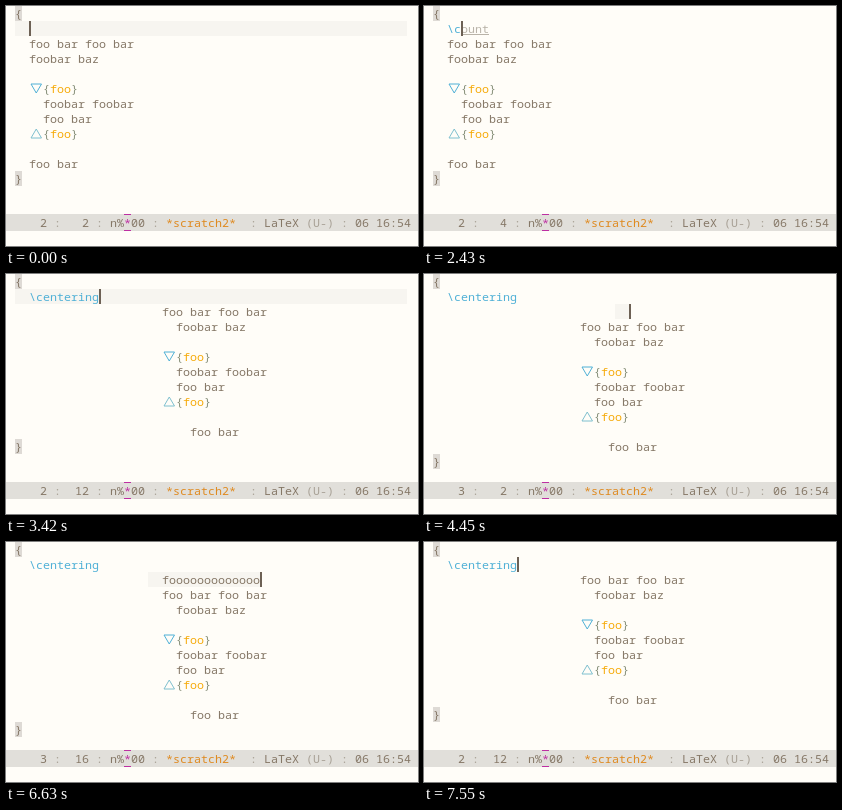
Write an HTML page that moves like this. It is 412x240 px and loops after 8 s.

```html
<!DOCTYPE html>
<html lang="en">
<head>
<meta charset="utf-8">
<title>Centering in an editor</title>
<style>
  html, body { margin: 0; width: 100%; height: 100%; overflow: hidden; background: #fffdf8; }
  svg { display: block; width: 412px; height: 240px; }
  text { font: 11.667px "Noto Sans Mono", monospace; white-space: pre; }
</style>
</head>
<body>
<svg id="stage" viewBox="0 0 412 240"></svg>
<script>
const LOOP = 8000, CHAR = 7, ROW = 15, LEFT = 9;
const INK = '#857766', DIM = '#a8a196', BLUE = '#4fb0d6', ORANGE = '#df8a20',
      GOLD = '#f6ab0c', BRACE = '#87907a', LINE = '#f7f5f0', MATCH = '#dedad5',
      REGION = '#a39c8f', BAR = '#e1dfda', CURSOR = '#6d6155', PINK = '#bd2fa2';
const COMMAND = '\\centering';
const stage = document.getElementById('stage');

const colX = col => LEFT + col * CHAR;
const rect = (x, y, w, h, fill) =>
  `<rect x="${x}" y="${y}" width="${w}" height="${h}" fill="${fill}"/>`;
const label = (x, y, str, fill = INK, extra = '') =>
  `<text x="${x}" y="${y}" fill="${fill}" ${extra}>${str}</text>`;
const put = (col, row, str, fill) => label(colX(col), row * ROW + 12, str, fill);
const fillRow = (x, row, right, fill) => rect(x, row * ROW, right - x, ROW, fill);
const cursor = (col, row) => rect(colX(col), row * ROW, 2, ROW, CURSOR);
const centerCol = width => 28 - Math.floor(width / 2);

// Number of command characters typed so far.
function commandLength(t) {
  if (t < 1310) return 0;
  if (t < 2430) return 1;
  if (t < 3150) return Math.min(8, 2 + Math.floor((t - 2430) / 90));
  return t < 3240 ? 9 : 10;
}

// Length of the "fooo..." word on the new line.
function wordLength(t) {
  if (t < 5100) return 0;
  if (t < 5370) return t < 5190 ? 2 : 3;
  if (t < 5640) return t < 5460 ? 4 : 5;
  if (t < 6450) return 6 + Math.floor(Math.min(8, Math.floor((t - 5640) / 90)) * 7 / 9);
  return t < 6630 ? 13 : 14;
}

function stateAt(t) {
  return {
    typed: commandLength(t),
    word: wordLength(t),
    centered: t >= 3330,
    newLine: t >= 4450 && t < 7550,
    selected: t >= 7460 && t < 7550,
    lineLit: t < 2430 || (t >= 3330 && t < 4450)
  };
}

function foldMark(col, row, up) {
  const x = colX(col), y = row * ROW;
  const [base, tip] = up ? [y + 12, y + 3] : [y + 3, y + 12];
  return `<path d="M${x + 2} ${base}H${x + 12.5}L${x + 7.25} ${tip}Z" fill="none" ` +
    `stroke="${up ? '#7fc0cf' : BLUE}"/>` +
    put(col + 2, row, '{', BRACE) + put(col + 3, row, 'foo', GOLD) + put(col + 6, row, '}', BRACE);
}

function body(s) {
  const top = s.newLine ? 3 : 2;
  const place = str => s.centered ? centerCol(str.length) : 2;
  const line = (row, str) => put(place(str), top + row, str);
  const block = s.centered ? centerCol(15) : 2;
  const brace = (row, ch) => rect(LEFT, row * ROW, CHAR, ROW, MATCH) + put(0, row, ch);
  return brace(0, '{') +
    line(0, 'foo bar foo bar') + line(1, 'foobar baz') +
    foldMark(block, top + 3, false) +
    put(block + 2, top + 4, 'foobar foobar') + put(block + 2, top + 5, 'foo bar') +
    foldMark(block, top + 6, true) +
    line(8, 'foo bar') + brace(top + 9, '}');
}

function editing(s) {
  const start = centerCol(s.word), end = start + s.word, onWord = s.newLine && !s.selected;
  let out = '';
  if (s.lineLit) out += fillRow(LEFT, 1, 401, LINE);
  if (s.selected) out += fillRow(colX(12), 1, 401, REGION) + fillRow(LEFT, 2, colX(end), REGION);
  else if (s.newLine) out += fillRow(colX(start - 2), 2, colX(end), LINE);

  out += put(2, 1, COMMAND.slice(0, s.typed), BLUE);
  if (s.typed > 1 && s.typed < 10) {
    const rest = s.typed === 2 ? 'ount' : COMMAND.slice(s.typed);
    const col = 2 + s.typed;
    out += put(col, 1, rest, '#b9b3a8') + rect(colX(col), 28, rest.length * CHAR, 1, '#b9b3a8');
  }
  if (s.newLine && s.word) {
    out += put(start, 2, 'f' + 'o'.repeat(s.word - 1), s.selected ? '#fffdf8' : INK);
  }
  return out + (onWord ? cursor(end, 2) : cursor(2 + s.typed, 1));
}

function statusBar(s) {
  const onWord = s.newLine && !s.selected;
  const column = s.selected ? 2 : 2 + (onWord ? s.word : s.typed);
  const item = (col, str, fill, extra) => label(6 + col * CHAR, 221, str, fill, extra);
  return rect(0, 208, 412, 17, BAR) +
    (s.selected ? rect(62, 208, 21, 17, ORANGE) : '') +
    item(4, onWord ? 3 : 2) +
    item(8, String(column).padStart(3), s.selected ? '#fffdf8' : INK) +
    [6, 12, 20, 34, 47].map(col => item(col, ':', DIM)).join('') +
    item(14, 'n%') + item(16, '*', PINK) + item(17, '00') +
    rect(118, 208, 7, 1, PINK) + rect(118, 224, 7, 1, PINK) +
    item(22, '*scratch2*', ORANGE, 'font-weight="700"') +
    item(36, 'LaTeX') + item(42, '(U-)', DIM) + item(49, '06 16:54');
}

let shown = '';
function frame(now) {
  const state = stateAt(now % LOOP), key = JSON.stringify(state);
  if (key !== shown) {
    shown = key;
    stage.innerHTML = editing(state) + body(state) + statusBar(state);
  }
  requestAnimationFrame(frame);
}
frame(performance.now());
</script>
</body>
</html>
```
